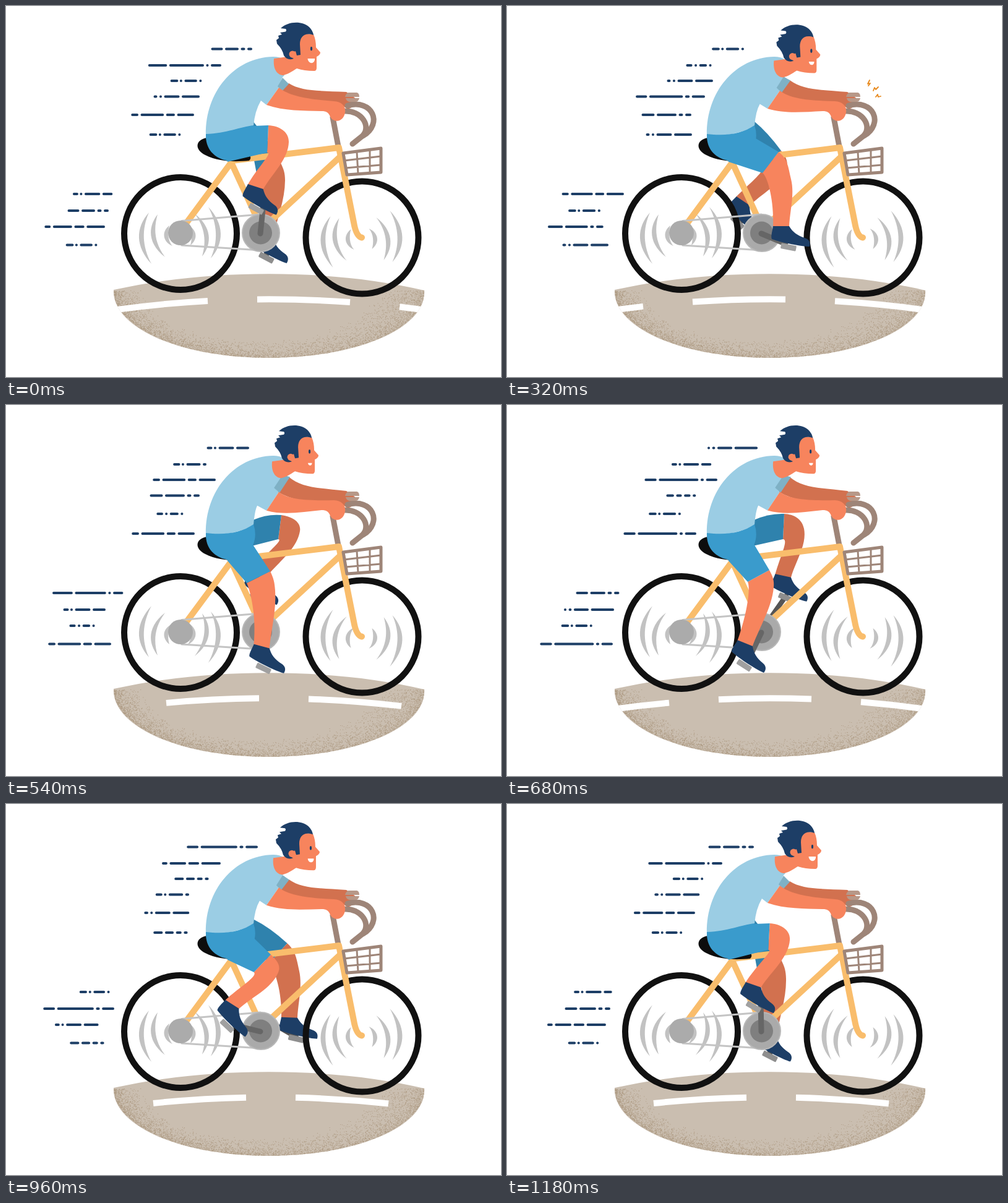
These frames come from a looping animation (800 by 600 pixels, 1.2 s). An HTML page:

```html
<!DOCTYPE html>
<html lang="en">
<head>
<meta charset="utf-8">
<title>Cyclist</title>
<style>
html, body { margin: 0; width: 100%; height: 100%; overflow: hidden; background: #fff; }
svg { display: block; width: 100vw; height: 100vh; }
.line { fill: none; stroke-linecap: round; stroke-linejoin: round; }
.frame { stroke: #f9bd6c; stroke-width: 10; }
.bar { stroke: #9e8578; stroke-width: 9; }
.navy { fill: #1d3e66; }
.skin { fill: #f7845d; }
.shade { fill: #d2714f; }
.shirt { fill: #9bcde4; }
</style>
</head>
<body>
<svg viewBox="0 0 800 600">
  <defs>
    <path id="ground" d="M174 459C330 424 530 425 676 460C680 520 570 569 425 569C270 569 170 515 174 459Z"/>
    <clipPath id="groundClip"><use href="#ground"/></clipPath>
    <path id="foot" d="M-13-1L13-1C19 9 26 14 38 18C45 20 48 25 46 32C34 32 1 26-15 20C-17 15-14 7-13-1Z"/>
    <rect id="pedal" x="-12.5" y="-4.5" width="25" height="9" rx="1.5" transform="translate(12 33) rotate(11)"/>
    <g id="half">
      <path d="M-50-37C-72-12-72 18-46 46C-61 18-62-10-50-37Z"/>
      <path d="M-36-34C-53-12-51 14-24 35C-41 12-43-10-36-34Z"/>
      <path d="M-17-16C-30-6-28 10-12 17C-20 8-20-6-17-16Z"/>
    </g>
    <g id="whirl" fill="#c2c2c2"><use href="#half"/><use href="#half" transform="rotate(180)"/></g>
  </defs>

  <path id="speed" class="line" stroke="#1d3e66" stroke-width="4"/>

  <use href="#ground" fill="#cabeb0"/>
  <g clip-path="url(#groundClip)">
    <path id="grain" fill="#ad9a82"/>
    <path id="lane" fill="none" stroke="#fff" stroke-width="10"/>
  </g>

  <path id="farCrank" class="line" stroke="#555" stroke-width="8"/>
  <g transform="translate(17 -18)">
    <path id="farLeg" class="shade"/>
    <path id="farShorts" fill="#2f82ad"/>
    <g id="farFoot"><use href="#pedal" fill="#8e8e8e"/><use href="#foot" class="navy"/></g>
  </g>

  <g id="rearWhirl"><use href="#whirl"/></g>
  <g id="frontWhirl"><use href="#whirl"/></g>
  <g fill="none" stroke="#111" stroke-width="10">
    <circle cx="282" cy="368" r="91"/>
    <circle cx="575.5" cy="374.5" r="91"/>
  </g>

  <path class="line bar" d="M528 180L537 227"/>
  <g class="line frame">
    <path d="M411 355L364 253L290 353"/>
    <path d="M366 250L538 229L562 350Q566 373 575 374.5"/>
    <path d="M425 350L542 242"/>
  </g>
  <path d="M325 213C306 216 304 232 322 241C345 253 375 252 393 250Q397 247 394 241L330 215Z" fill="#0d0d0d"/>

  <path class="line" stroke="#c4c4c4" stroke-width="3" d="M284 347.5L411 337M284 387L411 395"/>
  <circle cx="282" cy="367" r="20" fill="#ababab"/>
  <circle cx="412" cy="367" r="30" fill="#aaa" stroke="#b8b8b8" stroke-width="2"/>
  <circle cx="411.5" cy="367" r="18.5" fill="#7f7f7f"/>
  <path id="crank" class="line" stroke="#666" stroke-width="9"/>

  <g class="line bar">
    <path d="M545 238L606 230L606 269L551 273Z" stroke-width="5" style="stroke-width:5"/>
    <path d="M567 236L569 271M588 233V270M547 250L606 243M549 262L606 257" style="stroke-width:3"/>
  </g>

  <path id="shirt" class="shirt"/>
  <path id="farArm" class="shade"/>
  <path id="farSleeve" fill="#7fb1c5"/>
  <g class="line bar">
    <path d="M552 161C592 150 610 190 577 210"/>
    <path d="M546 170C575 168 592 196 575 211L560 223"/>
  </g>
  <path d="M553 140H567Q571 141 571 147H548Q549 142 553 140ZM549 149H571Q570 154 566 155H555Q550 154 549 149Z" fill="#b79888"/>
  <path id="arm" class="skin"/>

  <path id="leg" class="skin"/>
  <path id="shorts" fill="#3a9bcc"/>
  <g id="nearFoot"><use href="#pedal" fill="#a0a0a0"/><use href="#foot" class="navy"/></g>

  <g id="head">
    <path class="skin" d="M433 85C431 104 440 112 448 112C457 110 463 105 470 101Q482 105 498 105Q502 105 502 100V82Q508 79 508 75L501 67Q501 55 497 46L470 44L455 82Z"/>
    <path class="navy" d="M444 36C455 25 478 23 490 34Q496 40 497 47C482 42 475 50 475 62L476 79L470 80L468 73L460 76Q457 82 465 85Q455 89 449 80Q447 70 438 61L437 55L441 52L440 48L446 46L443 43L452 41.5Q454 39 452 37Z"/>
    <circle class="skin" cx="463" cy="78" r="5.5"/>
    <ellipse class="navy" cx="493.5" cy="69" rx="1.6" ry="3.3"/>
    <path id="smile" fill="#fff" d="M-6-3.5H5.5C6 6-5 6-6-3.5Z"/>
  </g>

  <path id="spark" class="line" stroke="#e8891c" stroke-width="1.8" d="M586 120L583 126L587 125L584 129M592 137L594 132L596 135L600 131M596 147L599 143L600 147L604 146"/>
</svg>
<script>
const LOOP = 1200, STEP = 20;
const $ = id => document.getElementById(id);
const set = (id, d) => $(id).setAttribute('d', d);
const place = (id, tf) => $(id).setAttribute('transform', tf);
const wrap = (v, n) => ((v % n) + n) % n;

// phase, cuff top, cuff bottom, knee, ankle, foot angle
const LEG = [
  [0, 424, 193, 422, 237, 457, 220, 403, 293, 18],
  [80, 431, 194, 429, 235, 463, 218, 429, 295, 12],
  [260, 441, 221, 425, 254, 469, 258, 451, 338, 0],
  [320, 439, 236, 413, 270, 459, 280, 443, 357, 0],
  [440, 434, 256, 400, 283, 453, 298, 436, 376, 7],
  [540, 427, 269, 389, 288, 435, 300, 413, 391, 15],
  [600, 426, 270, 388, 289, 434, 300, 402, 390, 17],
  [680, 424, 267, 389, 286, 431, 295, 384.5, 386, 22],
  [860, 423, 260, 389, 280, 428, 290, 363, 350, 36],
  [920, 426, 252, 396, 276, 434, 282, 364, 334, 34],
  [1040, 431, 224, 410, 261, 452, 250, 369, 308, 29],
  [1140, 428, 196, 423, 235, 458, 222, 389, 295, 21]
];

// phase, four stroke lengths, shift of the right end
const DASH = [
  [0, 19, 22, 7, 8, -9], [140, 10, 4, 12, 4, -17], [310, 13, 3, 21, 4, -24],
  [460, 9, 3, 26, 9, -24], [540, 9, 3, 25, 21, -14], [620, 6, 4, 25, 29, -7],
  [690, 3, 5, 24, 39, -1], [860, 13, 42, 13, 26, -1], [930, 18, 52, 8, 22, 0],
  [1000, 20, 69, 4, 17, 0], [1040, 34, 52, 4, 17, 0], [1160, 21, 32, 7, 10, -7]
];

// height, right end, phase shift
const ROWS = [
  [69.5, 407, 0], [96, 348, 1030], [121, 340, 300], [146.5, 320, 620], [176, 305, 840],
  [208, 306, 300], [304, 190, 510], [331, 175, 0], [357, 161, 810], [386.5, 171, 300]
];

function sample(keys, t, smooth) {
  t = wrap(t, LOOP);
  const n = keys.length;
  let i = n - 1;
  while (keys[i][0] > t) i--;
  const at = k => keys[wrap(k, n)];
  const time = k => at(k)[0] + Math.floor(k / n) * LOOP;
  const h = time(i + 1) - time(i), u = (t - time(i)) / h;
  return at(i).slice(1).map((p, c) => {
    const val = k => at(k)[c + 1];
    const q = val(i + 1);
    if (!smooth) return p + (q - p) * u;
    const slope = k => (val(k + 1) - val(k - 1)) / (time(k + 1) - time(k - 1)) * h;
    const a = slope(i), b = slope(i + 1), d = q - p;
    return p + u * (a + u * (3 * d - 2 * a - b + u * (a + b - 2 * d)));
  });
}

const unit = (x, y) => { const l = Math.hypot(x, y) || 1; return [x / l, y / l]; };
const pts = list => list.map(v => v.toFixed(2)).join(' ');

function legPath([tx, ty, bx, by, nx, ny, ax, ay, rot]) {
  const r = rot * Math.PI / 180, cx = 13 * Math.cos(r), cy = 13 * Math.sin(r);
  const fx = ax + cx, fy = ay + cy, gx = ax - cx, gy = ay - cy;
  const [ux, uy] = unit(by - ty, tx - bx);
  const [sx, sy] = unit(fx - nx, fy - ny);
  const [kx, ky] = unit(sx + ux * .45, sy + uy * .45);
  const up = .4 * Math.hypot(nx - tx, ny - ty);
  const low = .33 * Math.hypot(fx - nx, fy - ny);
  const back = .5 * Math.hypot(gx - bx, gy - by);
  return 'M' + pts([tx, ty]) +
    'C' + pts([tx + ux * up, ty + uy * up, nx - kx * up, ny - ky * up, nx, ny]) +
    'C' + pts([nx + kx * low, ny + ky * low, fx - sx * low, fy - sy * low, fx, fy]) +
    'L' + pts([gx, gy]) +
    'C' + pts([gx - sx * back, gy - sy * back, bx + ux * 10, by + uy * 10, bx, by]) + 'Z';
}

const footAt = p => `translate(${p[6]} ${p[7]}) rotate(${p[8]})`;

function drawLegs(t) {
  const p = sample(LEG, t, true), q = sample(LEG, t + LOOP / 2, true);
  const [tx, ty, bx, by] = p, [fx, fy, gx, gy] = q;
  set('leg', legPath(p));
  set('farLeg', legPath(q));
  place('nearFoot', footAt(p));
  place('farFoot', footAt(q));

  const lift = Math.max(0, Math.min(1, (236 - ty) / 43));
  set('shorts', `M323 207C356 ${211 - 5 * lift} 380 ${206 - 11 * lift} 400 193Q406 210 399 227` +
    `L362 251C335 247 322 230 323 207Z` +
    `M400 ${194 + (ty - 193) * .44}L${tx} ${ty}L${bx} ${by}L358 252L345 225L385 205Z`);
  set('farShorts', `M382 204Q${(382 + fx) / 2} ${(204 + fy) / 2 - 6} ${fx} ${fy}L${gx} ${gy}L380 246Z`);

  const w = t / LOOP * 2 * Math.PI;
  const a = (-84 + t * .3 + 11 * Math.sin(w)) * Math.PI / 180;
  set('crank', `M411 368L${411 + 42 * Math.cos(a)} ${368 + 42 * Math.sin(a)}`);
  const r = q[8] * Math.PI / 180;
  const px = q[6] + 17 + 12 * Math.cos(r) - 33 * Math.sin(r);
  const py = q[7] - 18 + 12 * Math.sin(r) + 33 * Math.cos(r);
  set('farCrank', `M422 350L${px} ${py - 3}`);
}

function drawBody(t) {
  const e = (1 - Math.cos(t / LOOP * 2 * Math.PI)) / 2;
  place('head', `translate(${-3 * e} ${6.5 * e})`);
  place('smile', `translate(${493.5 + .8 * e} ${88.5 + e}) scale(${1 - .45 * e})`);
  set('shirt', `M323 208C322 140 368 83 432 82Q442 82 448 86L450 112L447 115` +
    `L${440 - 6 * e} ${130 + 4 * e}L441 ${132 + 9 * e}L421 ${160 + 11 * e}L${412 - 6 * e} ${153 + 10 * e}` +
    `Q402 170 400 194Q365 213 323 208Z`);
  set('farArm', `M457 ${125 - 9 * e}C478 ${138 - 4 * e} 505 ${137 - 3 * e} 550 139L566 150Q565 163 552 167` +
    `L540 158L480 155Q455 150 440 ${137 + 4 * e}Z`);
  set('farSleeve', `M447 ${116 - 3 * e}L${457 + 2 * e} ${126 - 10 * e}L${446 - 4 * e} ${138 + 4 * e}L${439 - 6 * e} ${130 + 4 * e}Z`);
  set('arm', `M441 ${132 + 9 * e}C458 ${146 + 8 * e} 490 ${151 + 4 * e} 530 154C545 155 551 165 547 176` +
    `C543 188 529 189 524 179C521 172 518 170 510 170C480 ${169 + 4 * e} 450 ${170 + 9 * e} 421 ${160 + 11 * e}Z`);
}

function drawSpeed(t) {
  let d = '';
  for (const [y, end, shift] of ROWS) {
    const s = sample(DASH, t + shift, false);
    let x = end + s[4];
    for (let i = 3; i >= 0; i--) {
      const len = Math.max(4.1, s[i]);
      d += `M${(x - 2).toFixed(1)} ${y}H${(x - len + 2).toFixed(1)}`;
      x -= s[i] + 3.5;
    }
  }
  set('speed', d);
}

const laneY = x => 474.3 + .000275 * (x - 425) ** 2;

function drawLane(t) {
  const start = wrap(406 - (t % 400) / STEP * 21, 230);
  let d = '';
  for (let x = start - 230; x < 680; x += 230) {
    const mid = laneY(x) + .00055 * (x - 425) * 75;
    d += `M${x} ${laneY(x)}Q${x + 75} ${mid} ${x + 150} ${laneY(x + 150)}`;
  }
  set('lane', d);
}

function drawGrain() {
  let seed = 7, d = '';
  const rnd = () => (seed = (seed * 16807) % 2147483647) / 2147483647;
  for (let i = 0; i < 4200; i++) {
    const a = rnd() * Math.PI;
    const k = 1 - (.27 + .07 * Math.cos(a)) * rnd() * rnd();
    const x = 425 + 251 * k * Math.cos(a), y = 460 + 109 * k * Math.sin(a);
    d += `M${x.toFixed(1)} ${y.toFixed(1)}h1v1h-1z`;
  }
  set('grain', d);
}

function draw(t) {
  const flip = Math.floor(t / 40) % 2 ? -1 : 1;
  place('rearWhirl', `translate(281 371) scale(1 ${flip})`);
  place('frontWhirl', `translate(574.5 377) scale(1 ${flip})`);
  drawLegs(t);
  drawBody(t);
  drawSpeed(t);
  drawLane(t);
  $('spark').style.display = t >= 240 && t < 440 ? '' : 'none';
}

let began = null;
function tick(now) {
  if (began === null) began = now;
  draw(Math.floor((now - began) / STEP) * STEP % LOOP);
  requestAnimationFrame(tick);
}
drawGrain();
draw(0);
requestAnimationFrame(tick);
</script>
</body>
</html>
```
